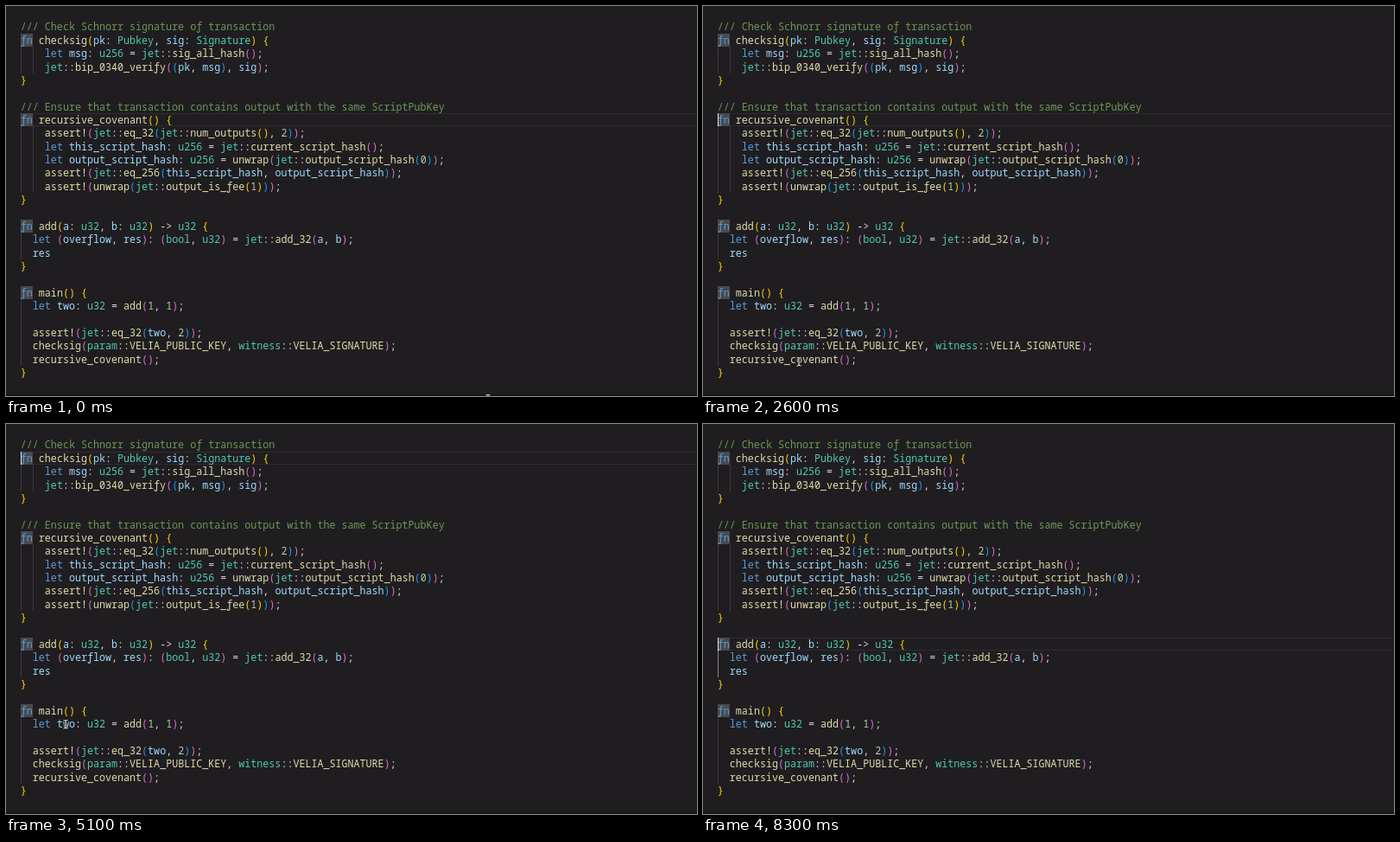
Write an HTML page that moves like this. It is 800x451 px and loops after 8400 ms.

```html
<!DOCTYPE html>
<html lang="en">
<head>
<meta charset="utf-8">
<title>Go to definition</title>
<style>
  html, body { margin: 0; width: 100%; height: 100%; overflow: hidden; background: #201d20; }
  #stage { position: relative; width: 800px; height: 451px; overflow: hidden; background: #201d20; }
  #stage div, #stage svg { position: absolute; }
  .code { font: 11.69px/15.37px "Noto Sans Mono", monospace; font-variant-ligatures: none; white-space: pre; color: #d4d4d4; }
  .comment { color: #6a9955; }
  .key { color: #569cd6; }
  .func { color: #dcdcaa; }
  .type { color: #4ec9b0; }
  .num { color: #b5cea8; }
  .name { color: #9cdcfe; }
  .b0 { color: #ffd700; }
  .b1 { color: #da70d6; }
  .b2 { color: #179fff; }
  .link { color: #4e94ce; text-decoration: underline; text-underline-offset: 2px; }
  .guide { width: 1px; background: #3c3a3c; }
  .guide.active { background: #858385; }
  .word { width: 14px; height: 15px; background: #4a494b; }
  .range { background: #5e2b17; }
  #current { left: 16px; width: 784px; height: 13.5px; border: solid #2e2c2e; border-width: 1px 0; }
  #caret { left: 17px; width: 1.4px; height: 14.5px; background: #e4e4e4; }
  #hover { left: 30px; top: 356px; width: 359px; height: 43px; background: #242124; border: 1px solid #3f3d40; }
  #hover hr { position: absolute; left: 0; top: 23px; width: 100%; margin: 0; border: 0; border-top: 1px solid #3f3d40; }
  #doc { left: 6.3px; top: 24px; font: 10.9px/17px "Open Sans", sans-serif; white-space: pre; color: #c8c8c8; }
  #edge { left: 0; top: 449px; width: 800px; height: 2px; background: #171517; }
</style>
</head>
<body>
<div id="stage">
  <div id="current"></div>
  <div id="back"></div>
  <div id="text"></div>
  <div id="caret"></div>
  <div id="hover">
    <div class="code" style="left:6.8px;top:3px"></div>
    <hr>
    <div id="doc">Ensure that transaction contains output with the same ScriptPubKey</div>
  </div>
  <div id="edge"></div>
  <svg id="mouse" width="20" height="20" viewBox="-8 -8 20 20" style="overflow:visible">
    <g id="beam" fill="none">
      <path d="M-2.5-4.5Q0-4.5 0-3Q0-4.5 2.5-4.5M0-3V3.5M-2.5 5Q0 5 0 3.5Q0 5 2.5 5" stroke="#111" stroke-width="2.6"/>
      <path d="M-2.5-4.5Q0-4.5 0-3Q0-4.5 2.5-4.5M0-3V3.5M-2.5 5Q0 5 0 3.5Q0 5 2.5 5" stroke="#eee" stroke-width="1.1"/>
    </g>
    <path id="hand" d="M-.8 5V-.5Q.2-1.8 1.2-.5V3L6 3.8Q7 4.2 6.8 5.4L6 9.6H.8L-2.2 6.2Q-2.6 4.6-.8 5Z"
      fill="#1b191b" stroke="#f2f2f2" stroke-width="1.1" stroke-linejoin="round"/>
  </svg>
</div>
<script>
const source = `/// Check Schnorr signature of transaction
fn checksig(pk: Pubkey, sig: Signature) {
    let msg: u256 = jet::sig_all_hash();
    jet::bip_0340_verify((pk, msg), sig);
}

/// Ensure that transaction contains output with the same ScriptPubKey
fn recursive_covenant() {
    assert!(jet::eq_32(jet::num_outputs(), 2));
    let this_script_hash: u256 = jet::current_script_hash();
    let output_script_hash: u256 = unwrap(jet::output_script_hash(0));
    assert!(jet::eq_256(this_script_hash, output_script_hash));
    assert!(unwrap(jet::output_is_fee(1)));
}

fn add(a: u32, b: u32) -> u32 {
  let (overflow, res): (bool, u32) = jet::add_32(a, b);
  res
}

fn main() {
  let two: u32 = add(1, 1);

  assert!(jet::eq_32(two, 2));
  checksig(param::VELIA_PUBLIC_KEY, witness::VELIA_SIGNATURE);
  recursive_covenant();
}`;

const LOOP = 8400, STEP = 100;
const LEFT = 16.8, TOP = 16.4, COL = 7.014, ROW = 15.37;
const lines = source.split('\n');
const $ = id => document.getElementById(id);
const rowY = row => TOP + row * ROW;
const hooked = s => s.replace(/f/g, 'ƒ');

function add(parent, cls, x, y, w, h) {
  const el = document.createElement('div');
  el.className = cls;
  el.style.left = x + 'px';
  el.style.top = y + 'px';
  if (w) el.style.width = w + 'px';
  if (h) el.style.height = h + 'px';
  return parent.appendChild(el);
}

const rules = [
  ['comment', /^\/\/\//],
  ['key', /^(fn|let)$/],
  ['type', /^(u\d+|bool|Pubkey|Signature|jet|param|witness)$/],
  ['num', /^\d/],
  ['func', /^([A-Z_]{3,}|\w+!)$/],
  ['name', /^\w/]
];
let depth = 0;

function tokenClass(token, next) {
  if ('({'.includes(token)) return 'b' + depth++ % 3;
  if (')}'.includes(token)) return 'b' + --depth % 3;
  const rule = rules.find(r => r[1].test(token));
  if (!rule) return '';
  return rule[0] === 'name' && next === '(' ? 'func' : rule[0];
}

function drawLine(line, row) {
  const el = add($('text'), 'code', LEFT, rowY(row));
  for (const m of line.matchAll(/\/\/\/.*|\w+!?|[(){}]|[^\w(){}]+/g)) {
    const span = document.createElement('span');
    span.className = tokenClass(m[0], line[m.index + m[0].length]);
    span.textContent = hooked(m[0]);
    el.append(span);
  }
  return el;
}

const rows = lines.map(drawLine);
$('hover').firstElementChild.textContent = hooked('fn recursive_covenant() -> ()');

// Function blocks: first row, last row
const blocks = [[1, 4], [7, 13], [15, 18], [20, 26]];
const words = [], guides = [], ranges = [];
blocks.forEach(([first, last], i) => {
  const y = rowY(first + 1), h = (last - first - 1) * ROW;
  guides.push(add($('back'), 'guide', 17, y, 1, h));
  if (i < 2) add($('back'), 'guide', 31, y, 1, h);
  words.push(add($('back'), 'word', 17, rowY(first) + .5));
  ranges.push(lines.slice(first, last + 1).map((line, k) => {
    const cols = line.length + (first + k === last - 1 ? 1 : 0);
    return add($('back'), 'range', LEFT, rowY(first + k), cols * COL, ROW + .3);
  }));
});

const findSpan = (row, name) => [...rows[row].children].find(s => s.textContent === name);
// Ctrl-hover start, click time, block reached, linked word
const jumps = [
  { from: 1400, click: 2200, block: 1, link: findSpan(25, 'recursive_covenant') },
  { from: 4100, click: 4700, block: 0, link: findSpan(24, 'checksig') },
  { from: 6300, click: 6900, block: 2, link: findSpan(21, 'add') }
];
const FLASH = 300;

// time, x, y
const path = [
  [0, 558, 454], [200, 482, 183], [300, 482, 183], [1100, 111, 411],
  [3100, 111, 411], [4000, 55, 395], [4700, 55, 395], [5000, 69, 347],
  [5300, 69, 347], [6200, 147, 345], [LOOP, 147, 345]
];

function mouseAt(t) {
  const i = path.findIndex(p => p[0] > t);
  const [t0, x0, y0] = path[i - 1], [t1, x1, y1] = path[i];
  const u = (t - t0) / (t1 - t0), e = u * u * (3 - 2 * u);
  return [x0 + (x1 - x0) * e, y0 + (y1 - y0) * e];
}

const show = (el, on) => { el.style.visibility = on ? 'visible' : 'hidden'; };

function render(t) {
  const done = jumps.filter(j => t >= j.click).pop();
  const block = done ? done.block : 1;
  const flash = !!done && t < done.click + FLASH;
  const y = rowY(blocks[block][0]);

  $('current').style.top = y + 'px';
  $('caret').style.top = y + .4 + 'px';
  const since = t - (done ? done.click : 500) + 1000;
  show($('caret'), since % 1000 < 500);

  words.forEach(w => show(w, !flash));
  ranges.forEach((r, i) => r.forEach(el => show(el, flash && i === block)));
  guides[2].classList.toggle('active', block === 2 && !flash);

  let hand = false;
  for (const j of jumps) {
    const on = t >= j.from && t < j.click;
    j.link.classList.toggle('link', on);
    hand = hand || on;
  }
  $('hover').style.display = t >= 1400 && t < 2200 ? '' : 'none';

  const [mx, my] = mouseAt(t);
  $('mouse').style.left = mx - 8 + 'px';
  $('mouse').style.top = my - 8 + 'px';
  $('mouse').style.display = t < 7600 ? '' : 'none';
  $('beam').style.display = hand ? 'none' : '';
  $('hand').style.display = hand ? '' : 'none';
}

const start = performance.now();
function tick() {
  const t = (performance.now() - start) % LOOP;
  render(Math.floor(t / STEP) * STEP);
  requestAnimationFrame(tick);
}
tick();
</script>
</body>
</html>
```
